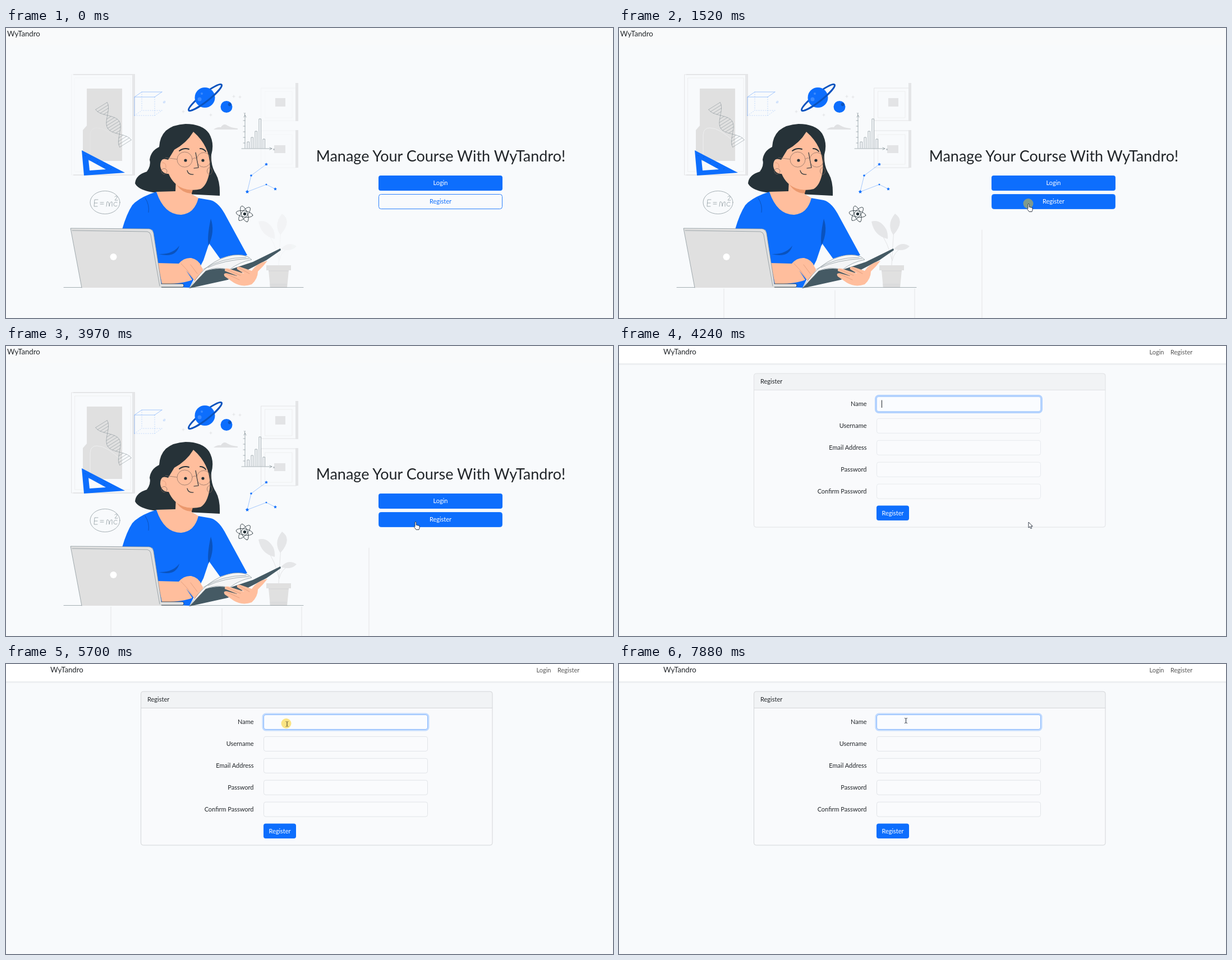
An HTML page that plays this animation: 1082x517 px, repeating every 8 s.

```html
<!DOCTYPE html>
<html lang="en">
<head>
<meta charset="utf-8">
<title>Course manager</title>
<style>
  html, body { margin: 0; width: 100%; height: 100%; overflow: hidden; background: #f8fafc; }
  svg { display: block; width: 100vw; height: 100vh; }
  text { font-family: Lato, "Open Sans", sans-serif; font-size: 11px; fill: #212529; }
  .brand { font-size: 13.2px; }
  .mid { text-anchor: middle; }
  .end { text-anchor: end; }
  .white { fill: #fff; }
  .blue { fill: #0d6efd; }
  .skin { fill: #ffbe9d; }
  .dark { fill: #263238; }
  .grey { fill: #e0e0e0; }
  .line, .sketch, .crease, .pale, .thin { fill: none; stroke-linecap: round; stroke-linejoin: round; }
  .line { stroke: #263238; stroke-width: .8; }
  .sketch { stroke: #78858c; stroke-width: .65; }
  .crease { stroke: #d58d6d; stroke-width: .6; }
  .pale { stroke: #e3e4e6; }
  .thin { stroke: #6da6fb; stroke-width: .6; }
  .tiny { font-size: 6px; fill: #78858c; }
</style>
</head>
<body>
<svg viewBox="0 0 1082 517" preserveAspectRatio="none">
  <rect width="1082" height="517" fill="#f8fafc"/>

  <g id="home">
    <rect width="1082" height="31" fill="#f9fafb"/>
    <text class="brand" x="2" y="15">WyTandro</text>

    <!-- wall: picture, shelves, plant -->
    <path class="grey" d="M144 108H207V237H137V182L144 174Z"/>
    <path d="M225 83H230V263H120V261H225ZM120 82H230V84H120Z" fill="#e6e7e9"/>
    <path d="M516 98H521V166H516ZM516 182H521V249H516Z" fill="#e4e5e7"/>
    <path d="M480 125H498V140H480ZM478 209H498V223H478Z" fill="#e3e4e6"/>
    <path d="M370 181Q377 176 383 177Q388 169 395 174Q401 178 413 179V181Z" fill="#e0e1e3"/>
    <g id="details">
      <path class="pale" d="M117 83H229V262H117Z"/>
      <path class="pale" d="M123 89H222V256H123Z" stroke-opacity=".5"/>
      <path d="M150 232V190Q151 178 162 178Q180 178 206 204" fill="none" stroke="#eeeff0"/>
      <path class="pale" d="M455 107H518V165H455ZM455 183H518V249H455Z"/>
      <path class="pale" d="M462 113H510V160H462ZM462 190H510V243H462Z" stroke-opacity=".5"/>
      <path class="pale" d="M486 423Q488 385 490 360M486 412Q480 383 464 362M487 415Q490 398 505 392"/>
      <path d="M450 345Q466 340 477 360Q480 369 479 376Q455 371 450 345ZM489 369Q476 350 492 331Q511 344 489 369ZM490 394Q503 379 518 389Q508 400 490 394Z" fill="#e5e6e8"/>
    </g>
    <path class="grey" d="M464 423H508V432H504L501 463H471L468 432H464Z"/>
    <path d="M468 433H504M470 457H501M470 460H501" fill="none" stroke="#cfd0d2" stroke-width=".8"/>
    <path id="desk" class="pale" d="M187 465V517M385 468V517M527 465V517M647 360V517"/>
    <path class="sketch" d="M103 462.500H530"/>

    <!-- science doodles -->
    <path id="helix" class="sketch" opacity=".75"/>
    <path class="blue" fill-rule="evenodd" d="M135 218L139 263L212 258ZM147 235L149 254L178 252Z"/>
    <path d="M140 227L142 228M150 231L152 229M162 240L164 238M174 247L176 245M186 252L188 250" stroke="#0a53be" stroke-width=".7"/>
    <path class="thin" d="M229 156V123H265M229 123L242 114H278M265 123L278 114"/>
    <path class="thin" stroke-dasharray="1 3" d="M229 156H265V123M242 114V147H278M229 156L242 147M265 156L278 147" opacity=".7"/>
    <text x="280" y="134" font-style="italic" style="font-size:8px;fill:#9cc2fb">a</text>
    <g id="planet">
      <ellipse cx="355" cy="124" rx="37" ry="7" transform="rotate(-38 355 124)" fill="none" stroke="#0a53be" stroke-width="3"/>
      <circle class="blue" cx="354.500" cy="124" r="18"/>
      <path d="M-37 0A37 7 0 0 0 37 0" transform="translate(355 124) rotate(-38)" fill="none" stroke="#0a53be" stroke-width="3"/>
      <circle cx="345" cy="127" r="3.500" fill="#3c8afe"/><circle cx="349" cy="117" r="2" fill="#3c8afe"/>
      <circle class="blue" cx="393" cy="140.500" r="10.500"/>
      <path d="M396 135a3 3 0 1 1 4 4a3 3 0 0 1-4-4" fill="#0a53be"/>
    </g>
    <path id="sparkles" stroke="#dcdee0" stroke-width=".8"/>
    <path class="sketch" d="M426 214V155l-2 4M426 155l2 4M420 215H474l-4-2M474 215l-4 2M423 165h3M423 175h3M423 185h3M423 195h3M423 205h3"/>
    <path id="bars" class="sketch"/>
    <text class="tiny" x="476" y="218">x</text>
    <text class="tiny" x="424" y="154">y</text>
    <g id="stars"><path class="thin" d="M464 243L437 263L430 292L464 279L480 287"/></g>
    <g id="atom"><circle class="dark" cx="425.500" cy="331.500" r="2.700"/></g>
    <ellipse class="sketch" cx="176.500" cy="311" rx="26.500" ry="20.500"/>
    <path class="sketch" d="M164 306H158L157 318H163M158 312H163M168 311H174M168 314H174M179 318L180 310Q184 308 184 318Q185 309 189 310L189 318M198 311Q192 309 192 315Q193 319 198 317M194 301Q198 297 198 302L194 307H199"/>

    <!-- student -->
    <path class="dark" d="M320 171Q298 172 285 183Q274 194 273 212Q258 219 256 235Q259 245 251 256Q231 262 230 277Q236 289 262 293L381 299Q382 274 374 260Q365 246 366 226Q372 205 362 188Q350 171 320 171Z"/>
    <path class="blue" d="M268 292Q237 302 225 316Q215 331 207 359L242 420L270 459L327 463L352 414L362 384L385 416L430 405L393 337Q380 311 365 307L342 303Z"/>
    <path class="skin" d="M303 270L302 291L268 292Q282 333 312 333Q336 331 343 303L331 296V284Z"/>
    <path d="M304 279Q320 290 333 288L331 295Q313 294 304 279Z" fill="#eb996e"/>
    <path class="skin" d="M334 185Q322 205 300 217L289 235Q275 229 275 246Q277 260 290 260Q298 279 316 286Q333 291 347 287Q359 280 363 255Q367 214 334 185Z"/>
    <g class="line">
      <path d="M309 219Q317 213 326 216M346 215Q352 215 356 220" stroke-width="2"/>
      <path d="M338 222L343 249L335 250M323 254Q325 262 334 261" stroke-width="1.200"/>
    </g>
    <path class="crease" d="M279 240Q286 240 285 249"/>
    <g class="dark"><circle cx="320" cy="236" r="2.600"/><circle cx="351" cy="236" r="2.600"/></g>
    <g fill="none" stroke="#806a60" stroke-width=".7">
      <circle cx="318.500" cy="234.500" r="13.500"/><ellipse cx="352.500" cy="235" rx="12.500" ry="13"/>
      <path d="M305 234L284 231M332 234Q336 230 340 233"/>
      <circle cx="282" cy="255.500" r="5"/><ellipse cx="363" cy="255" rx="4.500" ry="6"/>
    </g>
    <path d="M272 403Q297 404 309 388Q303 411 272 403ZM365 340Q373 362 361 388Q358 372 365 340Z" fill="#0a53be"/>
    <path d="M248 303Q256 315 254 329" fill="none" stroke="#0a53be"/>

    <!-- laptop, hands, book -->
    <path class="skin" d="M270 419L308 420Q317 409 330 410Q344 413 348 425Q354 433 351 440L345 438L348 449L341 447L333 432L344 450L338 453L321 432L332 449Q313 457 278 456Z"/>
    <path class="crease" d="M312 420L324 433L333 446M329 422L341 438"/>
    <path class="grey" d="M115 357L255 358Q262 359 263 365L278 463H135Z"/>
    <path class="sketch" d="M135 463L115 357L255 358Q261 359 263 366L277 456M118 361L252 363Q257 364 258 369L274 460"/>
    <circle cx="191.500" cy="408" r="6" fill="#fff"/>
    <path class="grey" d="M277 456H315Q319 459 315 462H277Z"/>
    <path class="line" d="M277 456H315Q319 459 315 462H277"/>
    <path d="M327 464L356 433Q378 426 398 431L414 441L395 449Z" fill="#455a64"/>
    <path d="M330 459L352 431Q376 409 404 405Q428 402 438 413Q416 417 398 431Q376 424 356 433Z" fill="#f4f5f6"/>
    <path class="sketch" d="M327 464Q357 414 404 405Q428 402 438 413Q416 417 398 431Q376 424 356 433L327 464M352 430Q385 409 428 409M360 427Q387 414 433 411"/>
    <path d="M398 431L440 417L489 393L490 396L464 414L414 440Z" fill="#455a64"/>
    <path class="skin" d="M466 415Q458 426 449 434Q449 447 438 457Q421 463 406 454L390 443Q386 437 393 437L415 443L390 433Q389 427 397 429L425 438L412 430Q410 425 418 426L438 433Q447 419 466 415Z"/>
    <path class="crease" d="M394 431L418 441M416 428L434 438M392 438L416 449"/>

    <text class="mid" x="775" y="238" style="font-size:27px">Manage Your Course With WyTandro!</text>
    <rect class="blue" x="664" y="263" width="221" height="27" rx="4"/>
    <text class="mid white" x="774.500" y="280">Login</text>
    <rect id="registerButton" x="664.500" y="296.500" width="220" height="26" rx="4" stroke="#2b80fd"/>
    <text id="registerLabel" class="mid" x="774.500" y="313">Register</text>
  </g>

  <g id="form">
    <rect y="31" width="1082" height="3" fill="#eff1f3"/>
    <rect width="1082" height="31" fill="#fff"/>
    <path d="M0 31.500H1082" stroke="#e8eaec"/>
    <text class="brand" x="79" y="15">WyTandro</text>
    <text x="945.500" y="14.500" style="fill:#555">Login</text>
    <text x="983" y="14.500" style="fill:#555">Register</text>
    <rect x="240.500" y="49" width="626.500" height="274" rx="4" fill="#f9fafc"/>
    <path d="M241 78V53Q241 49 245 49H863Q867 49 867 53V78Z" fill="#f1f3f5"/>
    <g id="cardLines" fill="none" stroke="#d3d5d8">
      <rect x="240.500" y="49" width="626.500" height="274" rx="4"/><path d="M241 78.500H867"/>
    </g>
    <text x="252" y="67">Register</text>
    <g id="fields"></g>
    <rect id="glow" x="458" y="89" width="295" height="29" rx="5" fill="#fafcff"/>
    <rect id="focus" x="459.500" y="90.500" width="292" height="26" rx="3.500" fill="none" stroke="#86b7fe"/>
    <path id="caret" d="M468.500 96.500V110" stroke="#212529"/>
    <rect class="blue" x="459" y="284.500" width="58" height="26.500" rx="4"/>
    <text class="mid white" x="488" y="301.500">Register</text>
  </g>

  <circle id="press" r="9"/>
  <g id="pointer" stroke="#222b3a" stroke-width=".9" stroke-linejoin="round">
    <path id="arrow" fill="#fff" d="M0 0V10L2.300 8L4 11.500L5.800 10.700L4.200 7.300H7.300Z"/>
    <path id="hand" fill="#fff" d="M0 1Q1.200-.500 2.200 1V6L8 7.500Q8.800 11 7 14.500H2L-1.500 9.500Q-1.500 8 0 9Z"/>
    <path id="beam" fill="none" d="M-2.500-4.500Q0-4.500 0-3V3Q0 4.500-2.500 4.500M2.500-4.500Q0-4.500 0-3V3Q0 4.500 2.500 4.500"/>
  </g>
</svg>

<script>
const LOOP = 8000, FORM_AT = 4240;
const $ = id => document.getElementById(id);
const show = (id, on) => $(id).setAttribute('display', on ? 'inline' : 'none');
const set = (id, attrs) => { for (const key in attrs) $(id).setAttribute(key, attrs[key]); };
const within = (t, a, b) => t >= a && t < b;

function buildDoodles() {
  const point = (s, side) => {
    const reach = side * 12 * Math.cos(2 * Math.PI * s);
    return `${170 + 43 * s + .85 * reach} ${139 + 67 * s - .53 * reach}`;
  };
  const strand = side => 'M' + Array.from({ length: 33 }, (_, i) => point(i / 32, side)).join('L');
  const rungs = Array.from({ length: 17 }, (_, i) => `M${point(i / 16, 1)}L${point(i / 16, -1)}`).join('');
  set('helix', { d: strand(1) + strand(-1) + rungs });

  set('bars', { d: [203, 195, 184, 162, 198].map((y, i) => `M${430 + i * 7} 214V${y}h3.500V214`).join('') });
  set('sparkles', { d: [[316, 149], [417, 123], [406, 122], [365, 155]]
    .map(([x, y]) => `M${x - 2.5} ${y}h5M${x} ${y - 2.5}v5`).join('') });

  const star = ([x, y, r]) => {
    const tips = Array.from({ length: 10 }, (_, i) => {
      const a = i * Math.PI / 5 - Math.PI / 2, d = i % 2 ? r / 2 : r;
      return `${x + d * Math.cos(a)},${y + d * Math.sin(a)}`;
    });
    return `<polygon class="blue" points="${tips.join(' ')}"/>`;
  };
  $('stars').innerHTML += [[464, 243, 3], [437, 263, 2.5], [430, 292, 3.5], [464, 279, 2], [480, 287, 3]].map(star).join('');
  $('atom').innerHTML += [10, 70, 130].map(a =>
    `<ellipse class="line" cx="425" cy="331.500" rx="15" ry="5.500" transform="rotate(${a} 425 331.500)"/>`).join('');
}

function buildFields() {
  $('fields').innerHTML = ['Name', 'Username', 'Email Address', 'Password', 'Confirm Password'].map((label, i) => {
    const y = 90.5 + 38.9 * i;
    return `<text class="end" x="441.500" y="${y + 16.5}">${label}</text>
      <rect x="459.500" y="${y}" width="292" height="26" rx="3.500" fill="#fafbfd" stroke="#e1e4e8"/>`;
  }).join('');
}

// Pointer stops: start time, x, y, shape
const stops = [
  [450, 837, 470, 'arrow'], [580, 801, 436, 'arrow'], [710, 769, 403, 'arrow'],
  [850, 749, 368, 'arrow'], [980, 736, 338, 'arrow'], [1120, 729, 313, 'hand'],
  [FORM_AT, 730, 314, 'arrow'], [4900, 706, 290, 'arrow'], [5030, 650, 238, 'arrow'],
  [5160, 580, 176, 'arrow'], [5290, 523, 124, 'arrow'], [5420, 501, 107, 'beam'],
  [6040, 511.5, 101, 'beam']
];

function drawPointer(t) {
  const stop = stops.filter(s => s[0] <= t).pop();
  show('pointer', stop);
  if (stop) {
    const [, x, y, shape] = stop;
    set('pointer', { transform: `translate(${x} ${y})` });
    for (const id of ['arrow', 'hand', 'beam']) show(id, id === shape);
  }
  const first = within(t, 1370, 3300), second = within(t, 5700, 5840);
  show('press', first || second);
  set('press', first ? { cx: 729.5, cy: 313, fill: '#7f9a8c' } : { cx: 499.5, cy: 106, fill: '#fbe483' });
  set('beam', { stroke: second ? '#75683c' : '#222b3a' });
}

function draw(t) {
  const onForm = t >= FORM_AT, hover = t >= 1120, settled = t >= 4760;
  show('home', !onForm);
  show('form', onForm);
  show('desk', t >= 1520);
  set('details', { opacity: t < 450 ? .3 : t < 710 ? .55 : t < 1520 ? .8 : 1 });
  set('registerButton', { fill: hover ? '#0d6efd' : '#f8fafc' });
  set('registerLabel', { style: `fill:${hover ? '#fff' : '#0d6efd'}` });
  set('cardLines', { opacity: settled ? 1 : .65 });
  set('fields', { 'stroke-opacity': settled ? 1 : .75 });
  set('glow', { stroke: settled ? '#c2dbfe' : '#b3d2fe', 'stroke-width': settled ? 3 : 4 });
  show('focus', settled);
  show('caret', [[FORM_AT, 4760], [5290, 5700], [6280, 6820], [7360, 7880]].some(([a, b]) => within(t, a, b)));
  drawPointer(t);
}

function tick() {
  draw(performance.now() % LOOP);
  requestAnimationFrame(tick);
}

buildDoodles();
buildFields();
tick();
</script>
</body>
</html>
```
